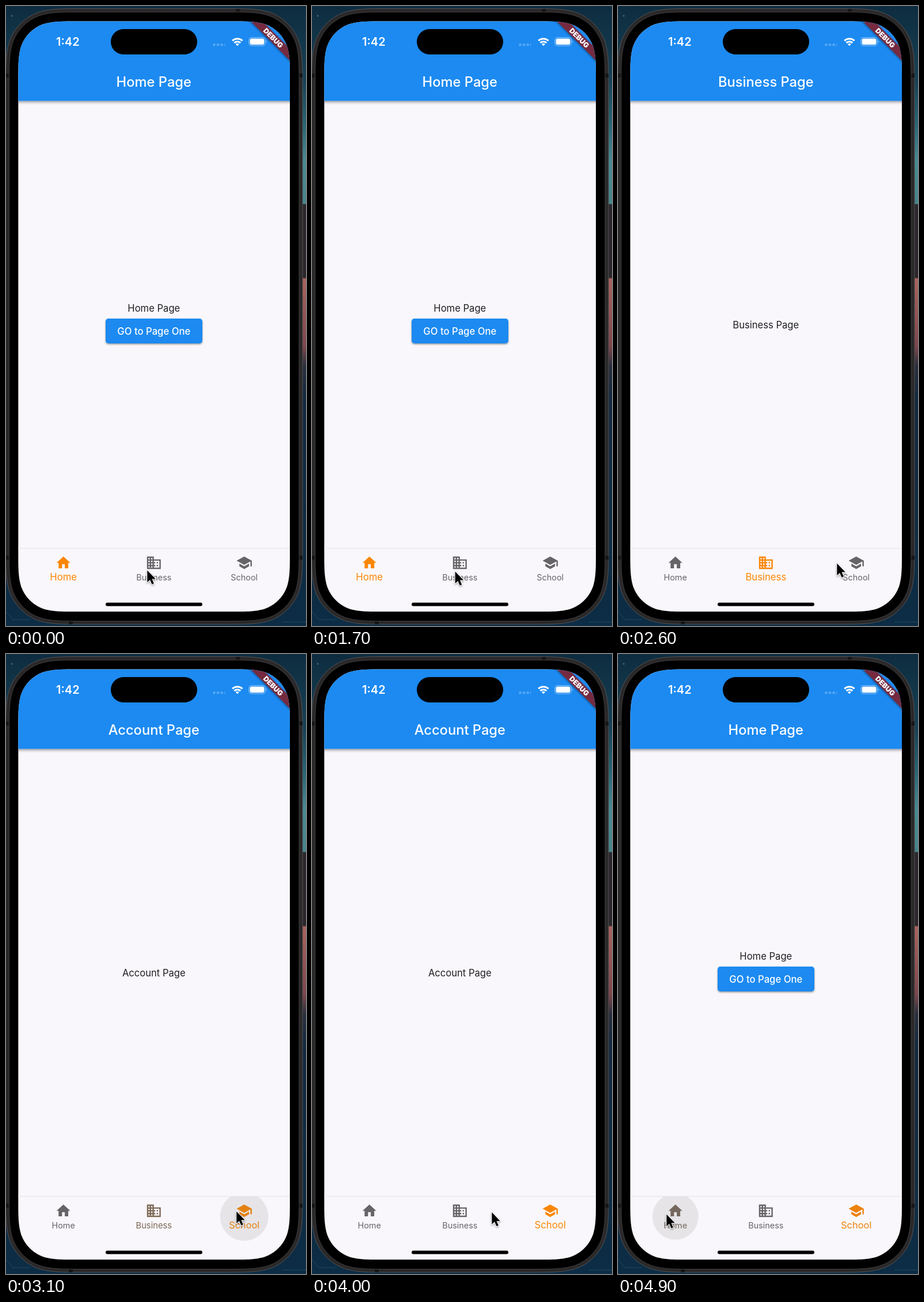
An HTML page that plays this animation: 521 by 1075 pixels, repeating every 5 s.

```html
<!DOCTYPE html>
<html lang="en">
<head>
<meta charset="utf-8">
<title>Bottom navigation demo</title>
<style>
  html, body { margin: 0; width: 100%; height: 100%; overflow: hidden; background: #0d2639; }
  svg { display: block; width: 100vw; height: 100vh; }
  text { font-family: Inter, Roboto, sans-serif; text-anchor: middle; }
  .body { font-size: 16.6px; fill: #1f1e21; }
  .medium { font-weight: 500; fill: #fff; }
</style>
</head>
<body>
<svg viewBox="0 0 521 1075" preserveAspectRatio="none">
  <defs>
    <linearGradient id="wallpaper" x2="0" y2="1">
      <stop offset="0" stop-color="#0e2c3f"/>
      <stop offset=".12" stop-color="#164155"/>
      <stop offset=".19" stop-color="#2a6574"/>
      <stop offset=".25" stop-color="#4a8a92"/>
      <stop offset=".319" stop-color="#47858b"/>
      <stop offset=".32" stop-color="#2b262b"/>
      <stop offset=".438" stop-color="#2b262b"/>
      <stop offset=".44" stop-color="#a8645e"/>
      <stop offset=".55" stop-color="#7c464c"/>
      <stop offset=".58" stop-color="#2a2f3e"/>
      <stop offset=".63" stop-color="#12293f"/>
      <stop offset="1" stop-color="#0c2d45"/>
    </linearGradient>
    <clipPath id="screen"><path id="screenShape"/></clipPath>
    <clipPath id="navArea"><rect x="21" y="941" width="472" height="109"/></clipPath>
    <filter id="barShadow" x="-10%" y="-10%" width="120%" height="130%">
      <feDropShadow dx="0" dy="2" stdDeviation="2.4" flood-opacity=".42"/>
    </filter>
    <filter id="softShadow" x="-30%" y="-30%" width="160%" height="180%">
      <feDropShadow dx="0" dy="1.5" stdDeviation="1.5" flood-opacity=".42"/>
    </filter>
  </defs>

  <rect width="521" height="1075" fill="url(#wallpaper)"/>
  <circle cx="10" cy="17" r="1.5" fill="#456879"/>
  <path d="M0 1050l12 14h30M480 1068h41" fill="none" stroke="#1c4a63"/>

  <!-- phone body -->
  <path id="frameShape" fill="#2a2829" stroke="#555254"/>
  <path d="M0 117h6v7h-6zM508 117h7v7h-7zM0 953h6v7h-6zM508 953h7v7h-7zM399 5h7v6h-7zM109 1066h7v6h-7z" fill="#171617"/>
  <path id="bezelShape" stroke="#403e40"/>

  <g clip-path="url(#screen)">
    <rect x="21" y="26" width="473" height="1025" fill="#f9f7fb"/>
    <rect x="10" y="10" width="495" height="154.5" fill="#1f8af1" filter="url(#barShadow)"/>
    <text id="title" class="medium" x="256.8" y="140" font-size="23.7"></text>

    <!-- status bar -->
    <text x="107.3" y="69" font-size="20" font-weight="600" fill="#fff">1:42</text>
    <rect x="182" y="40" width="150" height="44" rx="22"/>
    <path d="M361.5 67.2h21" stroke="#fff" stroke-opacity=".27" stroke-width="4" stroke-dasharray="4 2.6" transform="translate(-2)"/>
    <g fill="none" stroke="#fff" stroke-width="3">
      <path d="M393.2 60.2a12.6 12.6 0 0 1 17.4 0M396.5 63.8a7.8 7.8 0 0 1 10.8 0"/>
      <path d="M401.9 69.2l-3-3a4.2 4.2 0 0 1 6 0z" fill="#fff" stroke="none"/>
    </g>
    <rect x="421.7" y="54.7" width="28.6" height="14.2" rx="4.6" fill="none" stroke="#fff" stroke-opacity=".45" stroke-width="1.2"/>
    <rect x="423.6" y="56.6" width="24.8" height="10.4" rx="3" fill="#fff"/>
    <path d="M451.8 59.6q2.4 2.2 0 4.6z" fill="#fff" opacity=".5"/>

    <g transform="translate(493 26.5) rotate(45)">
      <rect x="-60" y="33.6" width="120" height="14.4" fill="#752b40" filter="url(#softShadow)"/>
      <text y="45.2" font-size="12.24" font-weight="900" fill="#fff">DEBUG</text>
    </g>

    <!-- page content -->
    <g id="homeContent">
      <text class="body" x="256.8" y="530">Home Page</text>
      <rect x="173" y="542" width="168" height="43" rx="4.8" fill="#1f8af1" filter="url(#softShadow)"/>
      <text class="medium" x="256.8" y="569.5" font-size="16.7">GO to Page One</text>
    </g>
    <text id="pageText" class="body" x="256.8" y="559"></text>

    <!-- bottom navigation -->
    <rect x="21" y="939.5" width="473" height="2" fill="#edebef"/>
    <circle id="ripple" cy="975.5" clip-path="url(#navArea)"/>
    <g id="nav"></g>
    <rect x="173" y="1034.5" width="168" height="6" rx="3"/>
  </g>

  <g id="cursor">
    <path d="M0 0V22.5L5.2 17.8 8.9 26.3 12.6 24.7 8.9 16.4H15.8Z" transform="translate(1.3 1.5) scale(.92)" stroke="#fff" stroke-width="2.2" paint-order="stroke" stroke-linejoin="round" filter="url(#softShadow)"/>
  </g>
</svg>

<script>
const LOOP = 5000, STEP = 100, SELECT_TIME = 200;
const ORANGE = [251, 134, 4], GREY = [102, 100, 103];

const tabs = [
  { label: 'Home', page: 'Home Page', x: 99.7, icon: 'M10 20v-6h4v6h5v-8h3L12 3 2 12h3v8z' },
  { label: 'Business', page: 'Business Page', x: 256.8,
    icon: 'M12 7V3H2v18h20V7zM6 19H4v-2h2zm0-4H4v-2h2zm0-4H4V9h2zm0-4H4V5h2zm4 12H8v-2h2zm0-4H8v-2h2zm0-4H8V9h2zm0-4H8V5h2zm10 12h-8v-2h2v-2h-2v-2h2v-2h-2V9h8zm-2-8h-2v2h2zm0 4h-2v2h2z' },
  { label: 'School', page: 'Account Page', x: 413.7,
    icon: 'M5 13.18v4L12 21l7-3.82v-4L12 17zM12 3L1 9l11 6 9-4.91V17h2V9z' }
];
const taps = [
  { time: -1000, from: 2, to: 0 },
  { time: 1820, from: 0, to: 1 },
  { time: 2950, from: 1, to: 2 },
  { time: 4860, from: 2, to: 0 }
];
// Pointer path: time, x, y
const pointer = [
  [0, 244, 977], [500, 244, 977], [1100, 249, 979], [1900, 247, 979], [2200, 247, 979],
  [2600, 379, 965], [2900, 399, 965], [3700, 399, 965], [4500, 121, 970], [4800, 83, 970], [5000, 83, 970]
];

const $ = id => document.getElementById(id);
const clamp = v => Math.max(0, Math.min(1, v));
const smooth = v => v * v * (3 - 2 * v);
const mix = (a, b, k) => a + (b - a) * k;

function add(parent, name, attrs) {
  const node = document.createElementNS('http://www.w3.org/2000/svg', name);
  set(node, attrs);
  return parent.appendChild(node);
}
function set(node, attrs) {
  for (const key in attrs) node.setAttribute(key, attrs[key]);
}

// Rectangle whose corners ease into the straight sides
function smoothRect(left, top, right, bottom, radius) {
  const corner = [[0, 1.529], [0, 1.088], [0, .868], [.075, .631], [.169, .373],
                  [.373, .169], [.631, .075], [.868, 0], [1.088, 0], [1.529, 0]];
  const place = (x, sx, y, sy, points) => {
    const [first, ...rest] = points.map(([px, py]) => `${x + sx * px * radius} ${y + sy * py * radius}`);
    return `${first}C${rest}`;
  };
  const reversed = [...corner].reverse();
  return 'M' + [
    place(left, 1, top, 1, corner), place(right, -1, top, 1, reversed),
    place(right, -1, bottom, -1, corner), place(left, 1, bottom, -1, reversed)
  ].join('L') + 'Z';
}
set($('frameShape'), { d: smoothRect(-.5, 4.5, 515, 1072, 89) });
set($('bezelShape'), { d: smoothRect(5.5, 10.5, 509, 1066.5, 83) });
set($('screenShape'), { d: smoothRect(21.3, 26.5, 493, 1050, 68) });

for (const tab of tabs) {
  tab.group = add($('nav'), 'g', {});
  add(tab.group, 'path', {
    d: tab.icon, 'fill-rule': 'evenodd', transform: `translate(${tab.x - 14.4} 951) scale(1.2)`
  });
  tab.text = add(tab.group, 'text', { x: tab.x });
  tab.text.textContent = tab.label;
}

function pointerAt(t) {
  const i = pointer.findIndex((p, n) => n && t <= p[0]);
  const [a, b] = [pointer[i - 1], pointer[i]];
  const k = smooth((t - a[0]) / (b[0] - a[0]));
  return [mix(a[1], b[1], k), mix(a[2], b[2], k)];
}

function draw(t) {
  const tap = taps.findLast(item => item.time <= t);
  const age = t - tap.time;
  const progress = smooth(clamp(age / SELECT_TIME));

  tabs.forEach((tab, i) => {
    const k = i === tap.to ? progress : i === tap.from ? 1 - progress : 0;
    set(tab.group, { fill: `rgb(${GREY.map((c, n) => Math.round(mix(c, ORANGE[n], k)))})` });
    set(tab.text, { 'font-size': mix(14.4, 16.7, k), y: mix(996, 995.6, k) });
  });

  set($('ripple'), {
    cx: tabs[tap.to].x,
    r: Math.min(42, 38 + age * .05),
    opacity: .08 * (1 - clamp((age - 150) / 250))
  });

  const home = tap.to === 0;
  $('title').textContent = tabs[tap.to].page;
  $('pageText').textContent = home ? '' : tabs[tap.to].page;
  set($('homeContent'), { visibility: home ? 'visible' : 'hidden' });
  set($('cursor'), { transform: `translate(${pointerAt(t)})` });
}

const start = performance.now();
function frame() {
  const t = (performance.now() - start) % LOOP;
  draw(Math.floor(t / STEP) * STEP);
  requestAnimationFrame(frame);
}
frame();
</script>
</body>
</html>
```
